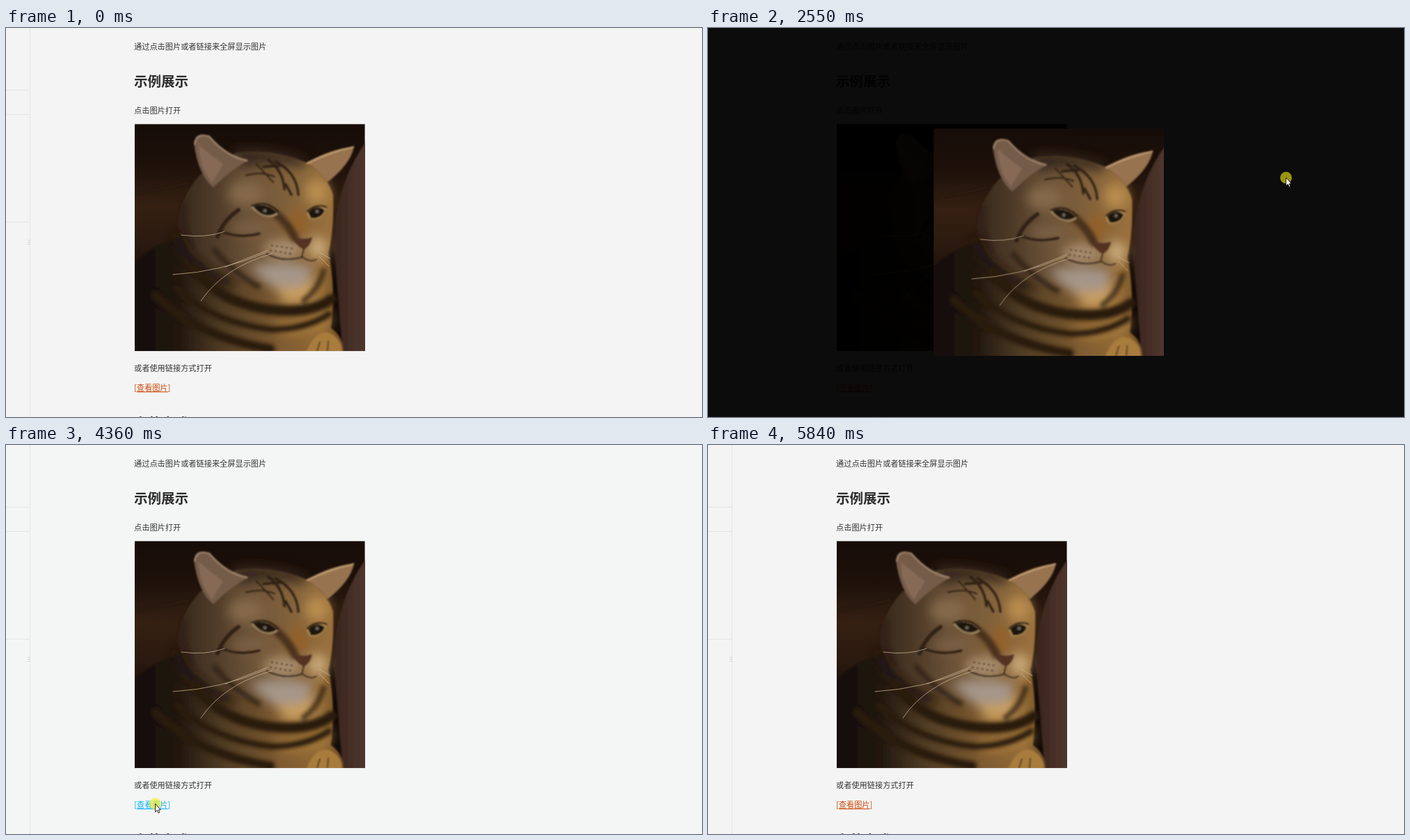
An HTML page for the animation above (6720 ms loop, 1000x560 px).

```html
<!DOCTYPE html>
<html lang="zh-CN">
<head>
<meta charset="utf-8">
<title>全屏显示图片</title>
<style>
  html, body { margin: 0; width: 100%; height: 100%; overflow: hidden; }
  svg { display: block; width: 100vw; height: 100vh; }
  text { font: 11.2px "Noto Sans CJK SC", "Noto Sans CJK", sans-serif; fill: #333; }
  .heading { font-size: 19.5px; font-weight: bold; fill: #2c2c2c; }
  #link text { fill: inherit; }
  .stripe { fill: none; stroke: #2a1c11; stroke-linecap: round; }
  .whisker { fill: none; stroke: #cdb595; stroke-linecap: round; opacity: .75; }
</style>
</head>
<body>
<svg viewBox="0 0 1000 560" preserveAspectRatio="none">
  <defs>
    <filter id="soft" x="-5%" y="-5%" width="110%" height="110%"><feGaussianBlur stdDeviation="1"/></filter>
    <filter id="fuzzy" x="-20%" y="-20%" width="140%" height="140%"><feGaussianBlur stdDeviation="2.5"/></filter>
    <filter id="softer" x="-30%" y="-30%" width="160%" height="160%"><feGaussianBlur stdDeviation="8"/></filter>
    <clipPath id="frame"><rect x="185" y="138.5" width="330.5" height="326.5"/></clipPath>
    <linearGradient id="room" x2="0" y2="1">
      <stop offset="0" stop-color="#160c07"/><stop offset=".18" stop-color="#1d110a"/>
      <stop offset=".36" stop-color="#352012"/><stop offset=".52" stop-color="#2b1a0f"/>
      <stop offset=".7" stop-color="#130c08"/>
    </linearGradient>
    <linearGradient id="wall"><stop offset="0" stop-color="#38241c"/><stop offset="1" stop-color="#513830"/></linearGradient>
    <linearGradient id="fur">
      <stop offset="0" stop-color="#120c08"/><stop offset=".22" stop-color="#21170e"/>
      <stop offset=".42" stop-color="#4d3a24"/><stop offset=".7" stop-color="#7d5a30"/>
      <stop offset=".9" stop-color="#926a34"/><stop offset="1" stop-color="#6d4a26"/>
    </linearGradient>
    <linearGradient id="face">
      <stop offset="0" stop-color="#35271a"/><stop offset=".2" stop-color="#4b3827"/>
      <stop offset=".45" stop-color="#6a5137"/><stop offset=".75" stop-color="#85643c"/>
      <stop offset="1" stop-color="#9b713c"/>
    </linearGradient>

    <g id="photo" clip-path="url(#frame)">
      <rect x="185" y="138" width="331" height="328" fill="url(#room)"/>
      <g filter="url(#soft)">
        <path d="M185 238Q225 233 262 223" class="stripe" stroke-width="3"/>
        <path d="M520 160Q478 215 470 300L484 470H520Z" fill="url(#wall)"/>
        <path d="M255 300Q190 320 180 350V470H485Q486 445 467 432Q474 380 464 325Z" fill="url(#fur)"/>
        <path d="M278 212Q244 252 248 290Q266 350 350 366Q425 368 460 335Q472 300 470 240Q461 212 432 194Q380 172 330 180Z" fill="url(#face)"/>

        <g filter="url(#softer)">
          <path d="M325 174Q385 170 435 190L425 200Q380 190 335 200Z" fill="#34251a"/>
          <path d="M248 290Q260 340 330 362L318 375Q250 345 240 300Z" fill="#21170f"/>
          <ellipse cx="345" cy="238" rx="26" ry="18" fill="#84694a"/>
          <ellipse cx="447" cy="236" rx="17" ry="18" fill="#ba8d50"/>
          <ellipse cx="420" cy="280" rx="12" ry="20" fill="#946126"/>
          <ellipse cx="350" cy="288" rx="28" ry="9" fill="#7d6246"/>
          <ellipse cx="398" cy="318" rx="28" ry="13" fill="#aa9071"/>
          <ellipse cx="448" cy="316" rx="13" ry="16" fill="#cbab7c"/>
          <path d="M350 342Q405 334 440 344Q436 380 412 392Q385 380 350 342Z" fill="#a5968a"/>
          <path d="M388 370Q420 382 446 358L440 396L400 398Z" fill="#c79c5c"/>
          <path d="M385 425Q430 432 464 405L468 425Q430 445 395 440Z" fill="#a77b3d"/>
        </g>

        <path d="M270 166Q272 148 292 156Q318 184 347 191Q322 205 298 229Q276 212 270 166Z" fill="#755c48"/>
        <path d="M277 168Q290 180 312 196L296 222Q278 200 277 168Z" fill="#866b57"/>
        <path d="M271 168Q273 150 292 156Q318 186 347 191" fill="none" stroke="#a58a72" stroke-width="2"/>
        <path d="M432 194Q466 174 500 171Q495 196 462 222Q450 205 432 194Z" fill="#97734f"/>
        <path d="M432 195Q466 178 500 171" fill="none" stroke="#c9a678" stroke-width="2"/>

        <g class="stripe" filter="url(#fuzzy)">
          <path d="M272 345Q300 393 375 405Q438 413 468 390" stroke-width="15"/>
          <path d="M245 375Q298 425 382 434Q430 434 464 412" stroke-width="9"/>
          <path d="M215 385Q275 445 380 462" stroke-width="13"/>
          <path d="M456 350Q450 375 428 392" stroke-width="8" opacity=".7"/>
          <path d="M300 320Q325 350 362 372" stroke-width="8" opacity=".7"/>
          <path d="M388 268Q404 280 415 302" stroke-width="12" stroke="#4a301c"/>
          <path d="M255 255Q252 290 266 312" stroke-width="8" opacity=".5"/>
        </g>
        <g class="stripe" opacity=".85">
          <path d="M377 190Q398 205 400 232M387 192Q418 208 420 240M370 200L395 198M402 225L410 240" stroke-width="4"/>
          <path d="M345 212Q366 206 386 214M360 196L384 222" stroke-width="2.5"/>
          <path d="M334 262Q313 276 304 300" stroke-width="6"/>
          <path d="M307 292Q335 304 364 296" stroke-width="4"/>
        </g>

        <path d="M352 256Q370 246 391 268Q373 280 352 258Z" fill="#a18763"/>
        <path d="M355 257Q374 250 389 266Q371 277 355 257Z" fill="#1d150e"/>
        <path d="M432 266Q445 250 460 260Q455 278 436 275Z" fill="#b58f58"/>
        <path d="M434 265Q447 253 458 262Q454 275 438 274Z" fill="#1d150e"/>
        <circle cx="372" cy="263" r="2.5" fill="#6b655d"/>
        <circle cx="447" cy="264" r="2.5" fill="#6b655d"/>
        <path d="M353 256Q375 247 391 264M433 264Q446 252 460 258" class="stripe" stroke-width="2.5"/>
        <path d="M411 300Q426 306 440 301Q438 314 428 319Q415 313 411 300Z" fill="#553323"/>
        <path d="M428 318L425 330Q400 338 374 325M426 330Q438 338 446 333" class="stripe" stroke-width="2"/>
        <path d="M382 313L415 318M380 320L410 325" class="stripe" stroke-width="2" stroke-dasharray="1 6"/>
        <path d="M430 470Q444 432 467 440Q486 452 482 470Z" fill="#a87b3e"/>
        <path d="M447 465L451 452M462 465L463 451" class="stripe" stroke-width="1.5"/>
      </g>
      <path d="M374 323Q310 351 240 355M382 325Q312 345 280 393M376 320L315 344M252 298Q287 303 314 293M450 323L466 332M450 329L464 343" class="whisker"/>
    </g>
  </defs>

  <rect id="paper" width="1000" height="560"/>
  <path d="M34.5 0V560M0 89.5H34M0 124.5H34M0 279.5H34" fill="none" stroke="#e4e4e4"/>
  <path d="M31.5 305.5h3M31.5 308.5h3M31.5 311.5h3" stroke="#b8b8b8" stroke-dasharray="1 1"/>
  <text x="184" y="30.8">通过点击图片或者链接来全屏显示图片</text>
  <text x="184" y="84.4" class="heading">示例展示</text>
  <text x="184" y="123.2">点击图片打开</text>
  <rect x="184.5" y="138" width="331.5" height="327.5" fill="#d9d4d1"/>
  <use href="#photo"/>
  <text x="184" y="494.2">或者使用链接方式打开</text>
  <g id="link">
    <text x="184" y="522.3">[<tspan text-decoration="underline">查看图片</tspan>]</text>
  </g>
  <text x="184" y="575.5" class="heading">安装方式</text>

  <g id="overlay">
    <rect width="1000" height="560" fill="#000" opacity=".953"/>
    <use href="#photo" x="139.2" y="6.2"/>
  </g>
  <g id="pointer">
    <circle id="press" cx=".5" cy=".5" r="8.4" fill="#f8ee10" opacity=".6"/>
    <path d="M.5 .5V12.2L3.2 9.7L5 13.8L6.8 13L5.1 9.1H8.2Z" fill="#fff" stroke="#111" stroke-width=".9"/>
  </g>
</svg>
<script>
const LOOP = 6720;
const byId = id => document.getElementById(id);
const within = (t, spans) => spans.some(([from, to]) => t >= from && t < to);

const OVERLAY = [[1330, 2820], [4490, 5560]];
const PRESS = [[1190, 1330], [2550, 2820], [4360, 4490]];
const COOL_TINT = [[2820, 4490]];

// Each move is a quadratic curve from one point to another, shown in discrete steps.
const move = (start, end, steps, from, bend, to, ease = true) => ({ start, end, steps, from, bend, to, ease });
const MOVES = [
  move(180, 790, 10, [649, 555], [640, 330], [407, 266], false),
  move(860, 1190, 5, [407, 266], [405, 264], [402, 262]),
  move(1760, 2090, 6, [402, 262], [610, 245], [830, 215]),
  move(2890, 3490, 10, [830, 215], [560, 345], [278, 484]),
  move(3560, 3900, 6, [278, 484], [245, 500], [214, 516]),
  move(4820, 5290, 8, [214, 516], [470, 470], [701, 377]),
  move(5630, 5840, 4, [701, 377], [690, 430], [645, 575])
];

function pointerAt(t) {
  const m = MOVES.filter(m => t >= m.start).pop();
  if (!m) return [649, 575];
  const gap = (m.end - m.start) / (m.steps - 1);
  const step = Math.floor((t - m.start) / gap + 1e-6) + 1;
  let p = Math.min(1, step / m.steps);
  if (m.ease) p = p * p * (3 - 2 * p);
  const q = 1 - p;
  return [0, 1].map(i => Math.round(q * q * m.from[i] + 2 * p * q * m.bend[i] + p * p * m.to[i]));
}

function show(id, visible) {
  byId(id).style.display = visible ? "" : "none";
}

function draw() {
  const t = performance.now() % LOOP;
  const [x, y] = pointerAt(t);
  const open = within(t, OVERLAY);
  const cool = within(t, COOL_TINT);
  const hover = !open && x >= 184 && x <= 236 && y >= 510 && y <= 526;

  byId("paper").setAttribute("fill", cool ? "#f4f6f5" : "#f4f4f4");
  byId("link").setAttribute("fill", hover ? "#0ab4f0" : cool ? "#e0560c" : "#cc4a0b");
  byId("pointer").setAttribute("transform", `translate(${x} ${y})`);
  show("overlay", open);
  show("press", within(t, PRESS));
  show("pointer", t >= 180 && t < 5840);
  requestAnimationFrame(draw);
}
draw();
</script>
</body>
</html>
```
